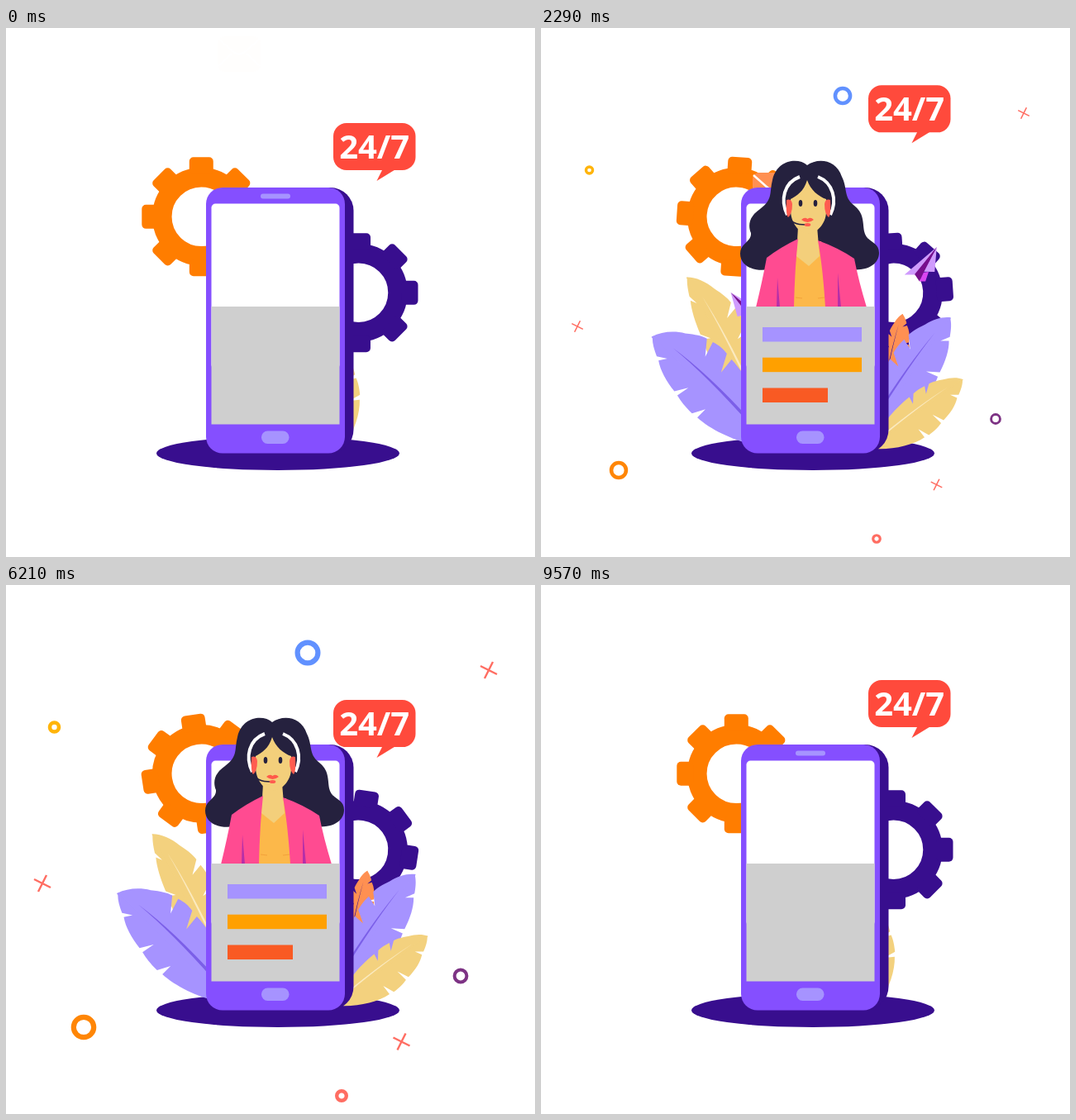
These frames come from a looping animation (640x640 px, 9.64 s). An HTML page:

```html
<!DOCTYPE html>
<html lang="en">
<head>
<meta charset="utf-8">
<title>24/7 support</title>
<style>
html, body { margin: 0; width: 100%; height: 100%; overflow: hidden; background: #fff; }
svg { display: block; width: 100vw; height: 100vh; }
text { font: 700 40px "Open Sans", "Noto Sans", sans-serif; }
</style>
</head>
<body>
<svg viewBox="0 0 640 640">
  <defs>
    <g id="gear">
      <circle r="47.5" fill="none" stroke="currentColor" stroke-width="23.5"/>
      <g id="teeth" fill="currentColor"></g>
    </g>
    <path id="wideHalf" d="M0-180C12-176 24-166 31-154C39-144 43-138 45-131L28-117L47-123C50-114 50-108 49-101L28-90L48-92C47-60 32-22 10 0H-1V-180Z"/>
    <path id="narrowHalf" d="M1 0H-6C-20-22-30-50-31-72L-17-72L-32-80C-32-92-31-100-29-108L-13-105L-28-114C-26-130-22-144-15-154L-6-148L-13-159C-9-168-5-175 1-180Z"/>
    <path id="vein" d="M8-152Q13-100 8-20L12-20Q16-100 8-152Z"/>
    <g id="plane">
      <path fill="#cf9bfd" d="M0 0L-47 21L-34 25ZM0 0L-24 24L-11 28Z"/>
      <path fill="#770f8c" d="M0 0L-35 24L-32 34L-24 25Z"/>
      <path fill="#d945f0" d="M-24 25L-32 34L-25 36L-18 26Z"/>
    </g>
    <g id="mail">
      <rect width="52" height="43" rx="8" fill="#ff9052"/>
      <path d="M1 3L18 18Q26 25 34 18L51 3M1 36L17 21M51 36L35 21" fill="none" stroke="#fff" stroke-width="2.4"/>
    </g>
    <clipPath id="abovePanel"><rect width="640" height="337.5"/></clipPath>
  </defs>

  <use id="gearL" href="#gear" color="#ff7d00"/>
  <use id="gearR" href="#gear" color="#380e8e"/>
  <g id="mails"></g>
  <ellipse cx="329" cy="514.5" rx="147" ry="20.5" fill="#380e8e"/>
  <g id="leaves"></g>
  <use id="planeL" href="#plane"/>
  <use id="planeR" href="#plane"/>

  <rect x="253" y="193" width="167.5" height="321" rx="28" fill="#380e8e"/>
  <rect x="242" y="193" width="168" height="321.5" rx="20" fill="#854fff"/>
  <rect x="248.5" y="212.5" width="155" height="200" rx="5" fill="#fff"/>
  <g fill="#a693ff">
    <rect x="308" y="200.5" width="36" height="6" rx="3"/>
    <rect x="309" y="487.5" width="33.5" height="15.5" rx="7.5"/>
  </g>

  <g clip-path="url(#abovePanel)">
    <g id="agent">
      <path fill="#25213e" d="M322 166C312 157 286 158 280 184C276 200 281 207 265 219C252 228 250 238 254 248C255 259 241 260 241 273C241 290 262 297 284 290H364C390 297 409 288 409 272C409 258 394 260 391 246C389 234 391 224 378 214C366 204 371 194 364 180C357 158 334 157 322 166Z"/>
      <path fill="#fcb84a" d="M307 258H339L348 338H304Z"/>
      <path fill="#f3cf7b" d="M311 240H334L337 276L324 288L309 276Z"/>
      <path fill="#f3cf7b" d="M322 184C318 198 309 203 302 207V222C303 239 315 249 323 249C332 249 345 238 345 222V207C336 204 326 196 322 184Z"/>
      <path fill="#ff4b91" d="M311 255Q290 265 273 278Q268 305 260 338H306Q307 290 311 255ZM335 257Q360 266 379 279Q384 305 394 338H344Q341 290 335 257Z"/>
      <path fill="#b52fa8" d="M286 302L289 338H285ZM359 296L363 338H359Z"/>
      <path d="M308 326L316 327M335 327L343 326" stroke="#f3a23a" fill="none"/>
      <path d="M313 180C294 187 289 208 298 226M335 180C353 187 359 208 350 226" fill="none" stroke="#fff" stroke-width="4"/>
      <path fill="#ff5c50" d="M297 208Q303 206 304 213Q304 225 299 229Q296 226 297 208ZM350 208Q344 206 343 213Q343 225 348 229Q351 226 350 208Z"/>
      <g fill="#25213e">
        <ellipse cx="314" cy="212" rx="2.3" ry="4"/>
        <ellipse cx="332" cy="212" rx="2.3" ry="4"/>
      </g>
      <path fill="#ff5a4a" d="M315 232Q319 228 322.5 231Q326 228 330 232Q322.5 238 315 232Z"/>
      <path d="M301 229Q303 238 320 238" fill="none" stroke="#25213e" stroke-width="1.3"/>
      <ellipse cx="322.5" cy="238" rx="3.8" ry="2" fill="#ff5c50"/>
    </g>
  </g>
  <rect x="248.5" y="337" width="155" height="142.5" fill="#cfcfcf"/>
  <rect class="bar" x="268" y="362" height="17.5" fill="#a693ff"/>
  <rect class="bar" x="268" y="398.7" height="17.5" fill="#ffa000"/>
  <rect class="bar" x="268" y="435.5" height="17.5" fill="#f95a23"/>

  <g id="bubble">
    <rect x="396" width="99.5" height="57" rx="16" fill="#ff4a3c"/>
    <path d="M456 55L448.5 70L473 55Z" fill="#ff4a3c"/>
    <text x="445.7" y="42.5" text-anchor="middle" fill="#fff">24/7</text>
  </g>
  <g id="bits" fill="none"></g>
</svg>
<script>
const LOOP = 9640, END = 9570;
const $ = id => document.getElementById(id);
const clamp = x => Math.max(0, Math.min(1, x));
const progress = (t, start, length) => clamp((t - start) / length);
const easeIn = x => x ** 3;
const easeOut = x => 1 - (1 - x) ** 3;
const easeInOut = x => x < .5 ? 2 * x * x : 1 - 2 * (1 - x) ** 2;
const sine = x => (1 - Math.cos(Math.PI * x)) / 2;
const backOut = x => 1 + 2.3 * (x - 1) ** 3 + 1.3 * (x - 1) ** 2;
const place = (el, transform) => el.setAttribute('transform', transform);

function add(parent, tag, attrs) {
  const el = document.createElementNS('http://www.w3.org/2000/svg', tag);
  for (const k in attrs) el.setAttribute(k, attrs[k]);
  return parent.appendChild(el);
}

for (let a = 0; a < 360; a += 45)
  add($('teeth'), 'rect', { x: -14.5, y: -72, width: 29, height: 20, rx: 5, transform: `rotate(${a})` });

// base x, y, rest angle, scale of wide half, narrow half and length, side, colours, exit start and length
const leaves = [
  [262, 470, -26.7, .75, .6, 1.05, 1, '#f3d17e', '#fbeabf', 7000, 1850],
  [262, 500, -45, 1, 1, 1, 1, '#a693ff', '#7b5fe8', 7300, 2170],
  [418, 430, 13, .24, .55, .48, -1, '#ff9052', '#380e8e', 7050, 1850],
  [400, 490, 34.2, .67, .95, .94, -1, '#a693ff', '#7b5fe8', 7300, 2300],
  [405, 505, 52.7, .46, .9, .735, -1, '#f3d17e', '#fbeabf', 7900, 1670]
].map(([x, y, angle, wide, narrow, tall, side, fill, vein, exit, length]) => {
  const el = add($('leaves'), 'g', {});
  const part = (id, width, color) =>
    add(el, 'use', { href: id, fill: color, transform: `scale(${side * width} ${tall})` });
  part('#wideHalf', wide, fill);
  part('#narrowHalf', narrow, fill);
  part('#vein', wide, vein);
  return { el, x, y, angle, side, exit, length };
});

const mails = [0, 2367, 3213, 6329].map(start => ({ start, el: add($('mails'), 'use', { href: '#mail' }) }));

const bits = [
  [365, 82, '#6191ff', 12.4, 6.2], [58.5, 172, '#ffb40a', 5.5, 4.6], [94, 535, '#ff8606', 12.2, 6.2],
  [550, 473, '#7d3384', 7.4, 4], [406, 618, '#ff6d62', 5.8, 4.4],
  [584, 103, '#ff6d62'], [44, 361, '#ff6d62'], [478.5, 552.5, '#ff6d62']
].map(([x, y, stroke, r, width]) => {
  const el = r
    ? add($('bits'), 'circle', { r, stroke, 'stroke-width': width })
    : add($('bits'), 'path', { d: 'M-10-5L10 5M5-10L-5 10', stroke, 'stroke-width': 2.4 });
  return { el, x, y, length: r ? 1100 : 1250 };
});

const bars = [...document.querySelectorAll('.bar')];

// smooth curve through three [time, value] pairs
function through(t, [[a, p], [b, q], [c, r]]) {
  return p * (t - b) * (t - c) / ((a - b) * (a - c)) +
         q * (t - a) * (t - c) / ((b - a) * (b - c)) +
         r * (t - a) * (t - b) / ((c - a) * (c - b));
}

function movePlane(el, t, times, xs, ys, angles, flip) {
  const at = values => through(t, values.map((v, i) => [times[i], v]));
  place(el, `translate(${at(xs)} ${at(ys)}) scale(${flip} 1) rotate(${at(angles)})`);
  el.setAttribute('opacity', t < times[0] - 500 ? 0 : 1 - progress(t, 4250, 850));
}

function bubbleY(t) {
  if (t < 3290) return 115 - 56 * easeInOut(t / 3290);
  if (t < 6450) return 59 + 81 * easeInOut((t - 3290) / 3160);
  return 140 - 25 * easeInOut((t - 6450) / (END - 6450));
}

function draw(now) {
  const t = Math.min(now % LOOP, END);
  const turn = 360 * t / END;
  place($('gearL'), `translate(236.3 228.3) rotate(${-turn})`);
  place($('gearR'), `translate(426.5 320.3) rotate(${turn})`);
  place($('bubble'), `translate(0 ${bubbleY(t)})`);

  for (const { el, start } of mails) {
    place(el, `translate(256 ${10 + 190 * sine(progress(t, start, 3000))})`);
    el.setAttribute('opacity', t < start + 3000 ? progress(t, start, 500) : 0);
  }

  for (const l of leaves) {
    const hidden = 1 - backOut(progress(t, 240, 2170)) + easeIn(progress(t, l.exit, l.length));
    place(l.el, `translate(${l.x} ${l.y}) rotate(${l.angle + l.side * 58 * hidden})`);
  }

  movePlane($('planeR'), t, [1500, 3290, 4930], [434, 530, 601], [329, 212, 193], [-33, 0, 17], 1);
  movePlane($('planeL'), t, [1900, 3290, 4930], [262, 149, 24], [335, 289, 260], [-12, 9, 31], -1);

  const size = easeOut(progress(t, 900, 1300)) - easeIn(progress(t, 7235, 1300));
  place($('agent'), `translate(325 545) scale(${size}) translate(-325 -545)`);

  bars.forEach((bar, i) => {
    const shown = easeOut(progress(t, 870 + 245 * i, 1000)) - easeIn(progress(t, 7885 - 370 * i, 1000));
    bar.setAttribute('width', (i < 2 ? 120 : 79) * shown);
  });

  for (const b of bits) {
    const scale = easeOut(progress(t, 1900, b.length)) - easeIn(progress(t, 9000, 550));
    place(b.el, `translate(${b.x} ${b.y}) scale(${scale})`);
  }
}

function tick() {
  draw(performance.now());
  requestAnimationFrame(tick);
}
tick();
</script>
</body>
</html>
```
